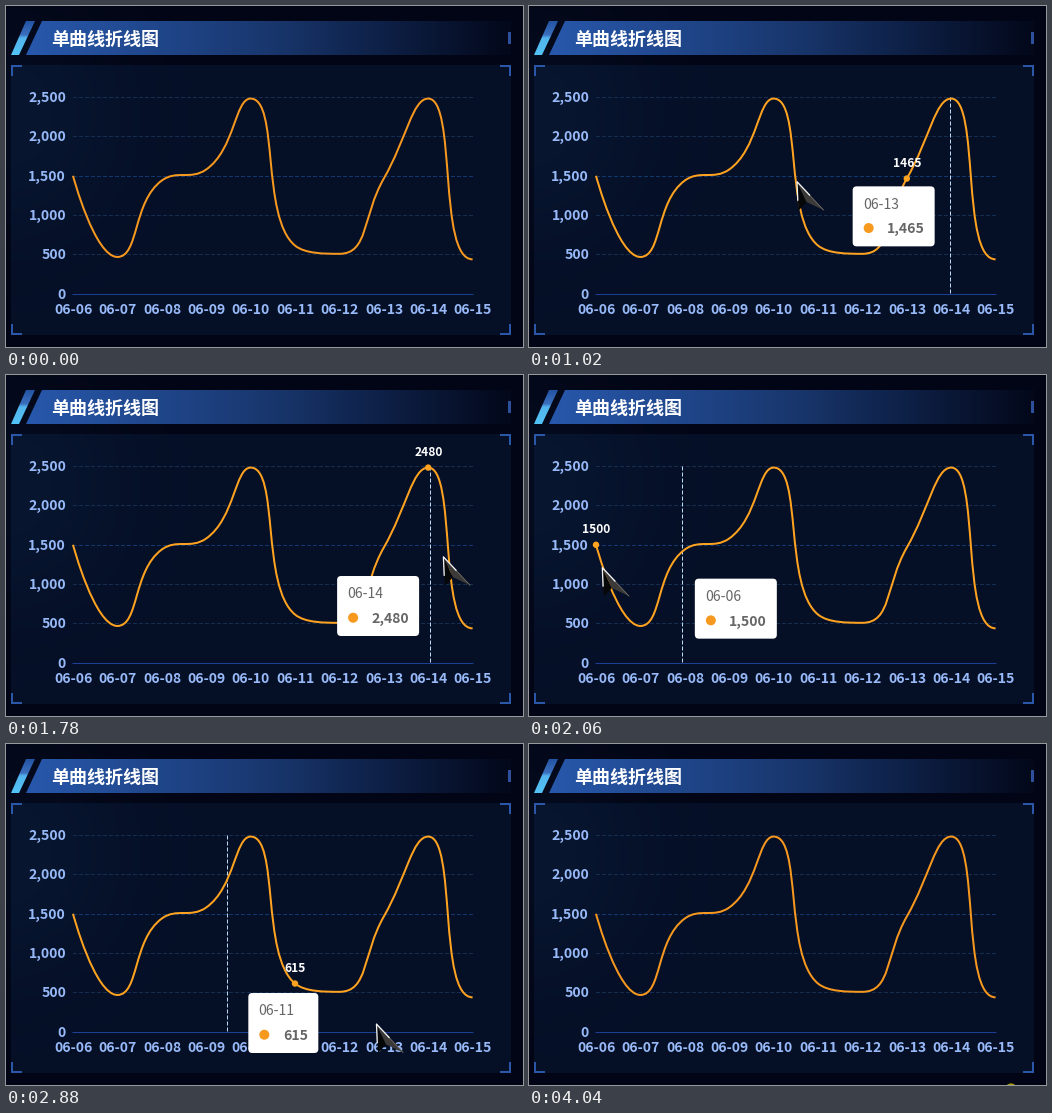
Recreate the animation shown at these times as a matplotlib script. Size 517 by 341 pixels, loop 4.17 s.

```python
import numpy as np
import matplotlib.pyplot as plt
from matplotlib.animation import FuncAnimation
from matplotlib.patches import Circle, FancyBboxPatch, PathPatch, Polygon
from matplotlib.path import Path

W, H, DPI = 517, 341, 64
PX = 72 / DPI
LOOP, TICK = 4170, 30
STEP = 68.75                 # ms between picture changes
DATA_LAG, GLIDE_LAG = 0.75, 1.74   # steps the chart trails the mouse

LEFT, SLOT = 67, 44.4
TOP, BASE = 91, 288
# the last value lies outside the plot and only bends the curve's end
VALUES = [1500, 470, 1440, 1580, 2480, 615, 510, 1465, 2480, 440, 520]
DAYS = [f"06-{d:02d}" for d in range(6, 16)]
CALM, LIT = "#f7981f", "#ffa320"
INK, GREY = "#97b9f8", "#666666"
DASH = (0, (4, 2))

# turning points of the mouse: step, x, y
TURNS = np.array([
    (2, 330, 330), (12.6, 432, 166), (17.9, 33, 188), (25, 437, 187),
    (26.2, 437, 181), (29.3, 67, 192), (34.7, 400, 194), (37.2, 104, 287),
    (44.65, 456, 277), (46.25, 456, 226), (50.5, 338, 233), (54, 340, 350),
])

plt.rcParams["font.family"] = ["Noto Sans CJK JP", "DejaVu Sans"]

fig = plt.figure(figsize=(W / DPI, H / DPI), dpi=DPI, facecolor="#020616")
ax = fig.add_axes([0, 0, 1, 1])
ax.axis("off")


def slot_x(i):
    return LEFT + SLOT * i


def value_y(v):
    return BASE - (BASE - TOP) * v / 2500


def ease(u):
    u = np.clip(u, 0, 1)
    return u ** 3 * (6 * u * u - 15 * u + 10)


def mouse_at(s):
    i = int(np.clip(np.searchsorted(TURNS[:, 0], s) - 1, 0, len(TURNS) - 2))
    a, b = TURNS[i], TURNS[i + 1]
    return (a + (b - a) * ease((s - a[0]) / (b[0] - a[0])))[1:]


def label(x, cy, s, size, color, ha="center", weight="normal", z=5):
    """Text whose digits are centred on cy."""
    return ax.text(x, cy + 0.365 * size, s, fontsize=size * PX, color=color,
                   ha=ha, va="baseline", weight=weight, zorder=z)


def place_text(text, x, cy, s, size):
    text.set_position((x, cy + 0.365 * size))
    text.set_text(s)


def rule(xs, ys, color, width=1, z=2, **kw):
    return ax.plot(xs, ys, color=color, lw=width * PX, zorder=z, snap=False, **kw)[0]


def poly(points, color, z=2):
    return ax.add_patch(Polygon(points, closed=True, fc=color, ec="none", zorder=z))


def ramp(points, stops, shades, vertical=False):
    """Polygon filled with a gradient along one axis."""
    (x0, y0), (x1, y1) = np.min(points, 0), np.max(points, 0)
    n = int(y1 - y0 if vertical else x1 - x0)
    row = np.stack([np.interp(np.linspace(0, 1, n), stops, c) for c in zip(*shades)], -1) / 255
    img = ax.imshow(row[:, None] if vertical else row[None], extent=(x0, x1, y1, y0),
                    interpolation="nearest", aspect="auto", zorder=1)
    img.set_clip_path(Polygon(points, transform=ax.transData))


def smooth_path(pts, smooth=0.5):
    """Bezier spline with control points kept inside each segment."""
    pts = np.asarray(pts, float)
    verts, codes = [pts[0]], [Path.MOVETO]
    out = pts[0]
    for prev, cur, nxt in zip(pts, pts[1:], pts[2:]):
        a, b = np.hypot(*(cur - prev)), np.hypot(*(nxt - cur))
        ahead = cur + (nxt - prev) * smooth * b / (a + b)
        ahead = np.clip(ahead, np.minimum(cur, nxt), np.maximum(cur, nxt))
        back = cur - (ahead - cur) * a / b
        back = np.clip(back, np.minimum(prev, cur), np.maximum(prev, cur))
        verts += [out, back, cur]
        codes += [Path.CURVE4] * 3
        out = cur + (cur - back) * b / a
    return Path(verts, codes)


# ---- page, panel and title bar ----
yy, xx = np.mgrid[0:H, 0:W] + 0.5
page = np.ones((H, W, 3)) * (2, 5, 21)
glow = np.exp(-(xx / 120) ** 2 - ((yy - 110) / 130) ** 2)
page += glow[..., None] * (3, 7, 10)
page[(xx > 5) & (xx < 505) & (yy > 59) & (yy < 329)] += (3, 10, 17)
ax.imshow(page / 255, extent=(0, W, H, 0), interpolation="nearest", aspect="auto", zorder=0)

ramp([(36, 15), (505, 15), (505, 49), (20, 49)], [0, 0.5, 0.75, 1],
     [(40, 88, 172), (25, 55, 110), (13, 31, 68), (3, 8, 26)])
ramp([(20, 15), (29, 15), (13, 49), (5, 49)], [0, 0.4, 0.5, 1],
     [(36, 85, 165), (60, 110, 190), (82, 180, 238), (82, 195, 246)], vertical=True)
ax.set_xlim(0, W)
ax.set_ylim(H, 0)

poly([(502, 26), (505, 26), (505, 38), (502, 38)], "#2c509c")
label(45, 32.2, "单曲线折线图", 18, "white", "left", "bold")

for cx, dx in ((6, 9), (504, -9)):
    for cy, dy in ((60, 9), (328, -9)):
        rule([cx + dx, cx, cx], [cy, cy, cy + dy], "#2b57a8", 2, solid_joinstyle="miter")

# ---- chart ----
for v in range(0, 2501, 500):
    y = np.floor(value_y(v) + 0.3) + 0.5
    if v:
        rule([LEFT, 467], [y, y], "#12376f" if v == 1500 else "#152d4e", ls=DASH)
    label(60, y - 0.2, f"{v:,}", 14, INK, "right", "bold")
rule([LEFT, 467], [BASE + 0.5] * 2, "#1b4095")
for i, day in enumerate(DAYS):
    label(slot_x(i) + 0.4, 303.3, day, 14, INK, weight="bold")

points = [(slot_x(i), value_y(v)) for i, v in enumerate(VALUES)]
curve = ax.add_patch(PathPatch(smooth_path(points), fc="none", ec=CALM, lw=2 * PX, zorder=4))

# ---- hover parts ----
pointer = rule([0, 0], [TOP + 0.5, BASE], "#bcdcf5", z=3, ls=DASH)
marker = ax.add_patch(Circle((0, 0), 3.2, fc=LIT, ec="none", zorder=6))
tag = label(0, 0, "", 12, "white", weight="bold", z=6)
box = ax.add_patch(FancyBboxPatch((0, 0), 82, 60, boxstyle="round,pad=0,rounding_size=4",
                                  fc="white", ec="none", zorder=7))
tip_day = label(0, 0, "", 14, GREY, "left", z=8)
tip_dot = ax.add_patch(Circle((0, 0), 5, fc=CALM, ec="none", zorder=8))
tip_value = label(0, 0, "", 14, GREY, "right", "bold", z=8)
hover = [pointer, marker, tag, box, tip_day, tip_dot, tip_value]

# ---- mouse arrow ----
FACETS = [
    (poly([(0, 0)] * 3, "#060708", 10), np.array([(0, 0), (2, 29.5), (10, 21)])),
    (poly([(0, 0)] * 3, "#3b3a38", 10), np.array([(0, 0), (27, 29), (10, 21)])),
]
EDGES = [
    (rule([], [], "#77736c", 0.8, 11), np.array([(12, 13), (27, 29)])),
    (rule([], [], "#f4f4f4", 1.3, 12), np.array([(1.2, 19), (0.4, 0.6), (13, 14)])),
]
mouse = [part for part, _ in FACETS + EDGES]

spot = ax.add_patch(Circle((482, 345.4), 6, fc="#a89c08", ec="none", zorder=12))


def show(parts, on):
    for part in parts:
        part.set_visible(on)


def place_hover(s):
    i = int(np.clip(round((mouse_at(s - DATA_LAG)[0] - LEFT) / SLOT), 0, 9))
    x, y = points[i]
    marker.center = (x, y)
    place_text(tag, x + 0.3, y - 15.8, str(VALUES[i]), 12)

    # the dashed pointer glides along, drawn towards the nearest day
    gx, gy = mouse_at(s - GLIDE_LAG)
    q = np.clip((gx - LEFT) / SLOT, 0, 9)
    near = round(q)
    px = round(slot_x(near + (2 * (q - near)) ** 3 / 2)) - 0.5
    pointer.set_xdata([px, px])

    # the tooltip swings to the mouse's left near the right border
    width = 82 if VALUES[i] > 999 else 70
    left = gx + 20 - (width + 40) * ease((gx - 390) / 25)
    top = min(gy + 14, 249)
    box.set_bounds(left, top, width, 60)
    place_text(tip_day, left + 10.3, top + 17.2, DAYS[i], 14)
    tip_dot.center = (left + 16, top + 41.7)
    place_text(tip_value, left + width - 10.3, top + 41.7, f"{VALUES[i]:,}", 14)


def update(frame):
    t = frame * TICK + 20
    s = int((t - 120) // STEP) + 2 if t >= 120 else 0
    hovering = 5 <= s < 56
    show(hover, hovering)
    curve.set_edgecolor(LIT if hovering else CALM)
    if hovering:
        place_hover(s)

    moving = 2 <= s <= 53
    show(mouse, moving)
    if moving:
        tip = mouse_at(s)
        for part, shape in FACETS:
            part.set_xy(shape + tip)
        for part, shape in EDGES:
            part.set_data(*(shape + tip).T)

    spot.set_visible(s >= 59)
    return hover + mouse + [curve, spot]


anim = FuncAnimation(fig, update, frames=LOOP // TICK, interval=TICK,
                     init_func=lambda: update(0), repeat=True, repeat_delay=0, blit=False)
plt.show()
```
